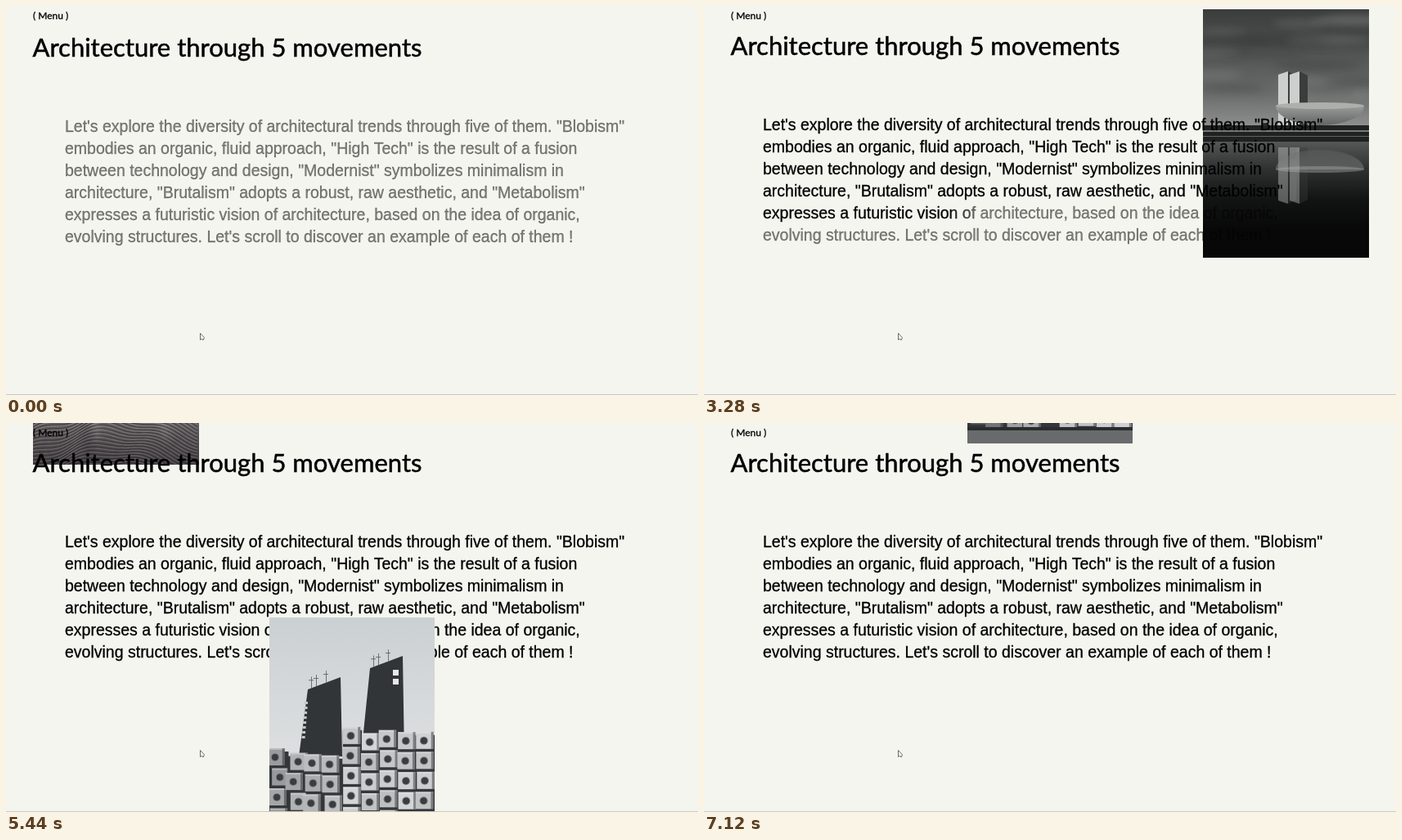
An HTML page with a canvas for the animation above (7200 ms loop, 846 px wide and 476 px high).

```html
<!DOCTYPE html>
<html lang="en">
<head>
<meta charset="utf-8">
<title>Architecture through 5 movements</title>
<style>
  html, body { margin: 0; width: 100%; height: 100%; overflow: hidden; background: #f5f5ef; }
  canvas { display: block; }
</style>
</head>
<body>
<canvas id="stage" width="846" height="476"></canvas>
<script>
const ctx = document.getElementById('stage').getContext('2d');
const LOOP = 7200, TICK = 80, TURN_GAP = 800, TURNS = 9;
const LAST_TURN = 0.68; // the page ends before the last wheel turn is used up
const BODY_FONT = '19.5px "Liberation Sans", Arial, sans-serif';
const TITLE_FONT = '31px Lato, sans-serif';
const MENU_FONT = '12px Lato, sans-serif';
const LINES = [
  'Let\'s explore the diversity of architectural trends through five of them. "Blobism"',
  'embodies an organic, fluid approach, "High Tech" is the result of a fusion',
  'between technology and design, "Modernist" symbolizes minimalism in',
  'architecture, "Brutalism" adopts a robust, raw aesthetic, and "Metabolism"',
  'expresses a futuristic vision of architecture, based on the idea of organic,',
  'evolving structures. Let\'s scroll to discover an example of each of them !'
];

const damped = x => 1 - (1 + x + x * x / 2) * Math.exp(-x);

function turnProgress(t, turn) {
  const length = turn < 5 ? 640 : 800;
  const rate = (turn < 5 ? 1.05 : 0.92) / TICK;
  const elapsed = Math.max(0, Math.min(t - turn * TURN_GAP, length));
  return damped(elapsed * rate) / damped(length * rate);
}

// Distance scrolled, in wheel turns.
function scrollAt(t) {
  let sum = 0;
  for (let turn = 0; turn < TURNS; turn++) {
    sum += turnProgress(t, turn) * (turn === TURNS - 1 ? LAST_TURN : 1);
  }
  return sum;
}

function seeded(seed) {
  return () => (seed = (seed * 16807) % 2147483647) / 2147483647;
}

function fade(g, from, to, ...colors) {
  const fill = g.createLinearGradient(0, from, 0, to);
  colors.forEach((color, i) => fill.addColorStop(i / (colors.length - 1), color));
  return fill;
}

function rect(g, x, y, w, h, fill) {
  g.fillStyle = fill;
  g.fillRect(x, y, w, h);
}

function poly(g, fill, ...points) {
  g.beginPath();
  points.forEach(([x, y]) => g.lineTo(x, y));
  g.closePath();
  g.fillStyle = fill;
  g.fill();
}

function oval(g, x, y, rx, ry, fill, end = Math.PI * 2) {
  g.beginPath();
  g.ellipse(x, y, rx, ry, 0, 0, end);
  g.fillStyle = fill;
  g.fill();
}

function picture(w, h, paint) {
  const c = document.createElement('canvas');
  c.width = w;
  c.height = h;
  paint(c.getContext('2d'), w, h);
  return c;
}

function twinTowersAndBowl(g) {
  for (const x of [92, 106]) {
    poly(g, '#cdcfce', [x, 80], [x + 12, 76], [x + 12, 145], [x, 145]);
    poly(g, '#3a3d3c', [x + 12, 76], [x + 22, 81], [x + 22, 145], [x + 12, 145]);
  }
  oval(g, 143, 118, 54, 24, fade(g, 116, 142, '#a0a2a0', '#626463'), Math.PI);
  oval(g, 143, 118, 54, 4, '#adafad');
}

const modernist = picture(203, 304, (g, w, h) => {
  const horizon = 157;
  const rnd = seeded(41);
  rect(g, 0, 0, w, horizon, fade(g, 0, horizon, '#3b3d3c', '#515352', '#6b6d6c', '#9a9b9a'));
  g.filter = 'blur(5px)';
  for (let i = 0; i < 22; i++) {
    const cloud = i % 2 ? 'rgba(150,152,150,0.22)' : 'rgba(40,42,41,0.22)';
    oval(g, rnd() * w, 12 + rnd() * 95, 25 + rnd() * 35, 3 + rnd() * 4, cloud);
  }
  g.filter = 'none';
  rect(g, 0, horizon, w, h, fade(g, horizon, 270, '#5b5d5d', '#303232', '#121313', '#080808'));
  twinTowersAndBowl(g);

  g.save();
  g.globalAlpha = 0.4;
  g.translate(0, horizon * 2);
  g.scale(1, -1);
  twinTowersAndBowl(g);
  g.restore();

  rect(g, 0, 142, w, 20, '#202121');
  rect(g, 0, 148, w, 2, '#777978');
  rect(g, 0, 155, w, 1, '#616362');
});

const organic = picture(203, 304, (g, w, h) => {
  const peak = 19, axis = 97;
  const rnd = seeded(12);
  const sky = g.createLinearGradient(0, 130, w, 40);
  sky.addColorStop(0, '#2f8dad');
  sky.addColorStop(1, '#57c6e5');
  rect(g, 0, 0, w, h, sky);

  // Both flanks widen as a power of the depth below the peak.
  const flank = y => 5.4 * (y - peak) ** 0.56 + 2 * Math.sin(y * 0.13);
  g.beginPath();
  for (let y = peak; y <= h; y += 3) g.lineTo(axis + flank(y), y);
  for (let y = h; y >= peak; y -= 3) g.lineTo(axis - flank(y), y);
  g.clip();
  rect(g, 0, 0, w, h, fade(g, peak, h, '#cfc6c4', '#bcb2b2', '#a39a9b', '#5a5658'));

  g.filter = 'blur(4px)';
  for (let i = 0; i < 26; i++) {
    const fold = i % 2 ? 'rgba(235,224,221,0.4)' : 'rgba(60,54,60,0.4)';
    oval(g, rnd() * w, 50 + rnd() * 230, 5 + rnd() * 9, 10 + rnd() * 22, fold);
  }
  g.filter = 'none';
  oval(g, 66, 98, 9, 26, '#294f62');
  oval(g, 166, 147, 7, 9, '#3d8aa5');

  // Undulating floor slabs drooping away from the axis
  g.lineWidth = 1.1;
  for (let y = -30; y < h; y += 4) {
    for (const [shift, color] of [[0, 'rgba(48,43,47,0.55)'], [1.6, 'rgba(237,226,224,0.45)']]) {
      g.beginPath();
      for (let x = 0; x <= w; x += 3) {
        const droop = Math.hypot(x - axis, 20) * 0.35;
        g.lineTo(x, y + shift + droop + 4 * Math.sin(x * 0.08 + y * 0.045));
      }
      g.strokeStyle = color;
      g.stroke();
    }
  }
  for (let y = 148; y < 174; y += 6) oval(g, axis, y, 3, 1.8, '#242326');
  rect(g, 0, 0, w, h, fade(g, 170, h, 'rgba(35,32,36,0)', 'rgba(35,32,36,0.5)'));
});

function slantedTower(g, x, top) {
  poly(g, '#323537', [x, top], [x + 40, top - 15], [x + 42, 170], [x - 11, 170]);
  for (const mast of [4, 10, 22]) {
    rect(g, x + mast, top - 14 - mast * 0.4, 0.8, 14, '#55595b');
    rect(g, x + mast - 3, top - 10 - mast * 0.4, 6, 0.8, '#55595b');
  }
}

function capsule(g, x, y, w, h, light) {
  rect(g, x, y, w, h, `rgb(${light},${light + 2},${light + 3})`);
  rect(g, x, y, w, 2, 'rgba(240,242,242,0.35)');
  rect(g, x + w - 3, y, 3, h, 'rgba(32,34,36,0.45)');
  oval(g, x + w * 0.45, y + h * 0.52, 5, 5, '#7c8082');
  oval(g, x + w * 0.45, y + h * 0.52, 4, 4, '#3a3d3f');
}

const capsules = picture(202, 376, (g, w, h) => {
  const columns = 9, pitch = w / columns, floorHeight = 24.5, ground = 356;
  const rnd = seeded(73);
  rect(g, 0, 0, w, h, fade(g, 0, 200, '#cbd0d3', '#e0e2e2'));
  slantedTower(g, 47, 88);
  slantedTower(g, 123, 62);
  for (let y = 103; y < 150; y += 6) rect(g, 43 - (y - 103) * 0.08, y, 4, 3, '#c5c8c8');
  for (const y of [64, 75]) rect(g, 151, y, 7, 7, '#e7e8e8');

  // Capsules protrude more on the left block; the right block is taller.
  for (let i = 0; i < columns; i++) {
    const leftBlock = i < 4;
    const top = (leftBlock ? 160 : 132) + rnd() * 10;
    rect(g, i * pitch, top + 4, pitch + 1, ground - top, '#34373a');
    for (let y = top; y < ground - 8; y += floorHeight) {
      const shade = leftBlock ? (4 - i) * (y > 245 ? 26 : 12) : 0;
      const light = Math.round(200 - shade + rnd() * 24 - 12);
      const jut = leftBlock ? rnd() * 8 - 4 : rnd() * 2 - 1;
      capsule(g, i * pitch + jut, y, pitch - 1, Math.min(21, ground - y), light);
    }
  }
  rect(g, 0, ground, w, 4, '#292c2e');
  rect(g, 0, ground + 4, w, 16, '#686a6c');
});

function text(string, x, y, weight) {
  ctx.lineWidth = weight;
  ctx.fillText(string, x, y);
  ctx.strokeText(string, x, y);
}

// Text turns from grey to black behind a front counted in letters.
function drawParagraph(front, dy) {
  const left = 72, soft = 5;
  ctx.font = BODY_FONT;
  let start = 0;
  LINES.forEach((line, row) => {
    const letter = ctx.measureText(line).width / line.length;
    const edge = left + (front - start) * letter;
    const ink = ctx.createLinearGradient(edge - soft * letter, 0, edge, 0);
    ink.addColorStop(0, '#000');
    ink.addColorStop(1, 'rgba(0,0,0,0.5)');
    ctx.fillStyle = ctx.strokeStyle = ink;
    text(line, left, 151.5 + row * 27 + dy, 0.3);
    start += line.length;
  });
}

function drawHeading(dy) {
  ctx.fillStyle = ctx.strokeStyle = '#000';
  ctx.font = MENU_FONT;
  text('( Menu )', 33, 16, 0.3);
  ctx.font = TITLE_FONT;
  text('Architecture through 5 movements', 32.5, 59.5 + dy, 0.5);
}

function drawPointer() {
  poly(ctx, '#fff', [237.5, 400.5], [237.5, 408.5], [239.5, 407], [241, 409], [242.5, 406]);
  ctx.strokeStyle = '#444';
  ctx.lineWidth = 0.8;
  ctx.stroke();
}

function draw(t) {
  const scroll = scrollAt(t);
  const dy = 2 * Math.max(0, 1 - scroll);
  rect(ctx, 0, 0, 846, 476, '#f5f5ef');
  ctx.drawImage(modernist, 610, Math.round(340 - 308 * (scroll - 3)));
  ctx.drawImage(organic, 33, Math.round(196 - 457 * (scroll - 6)));
  drawHeading(dy);
  drawParagraph(89 * scroll - 34, dy);
  ctx.drawImage(capsules, 322, Math.round(-116 - 347.5 * (scroll - 8)));
  rect(ctx, 0, 475, 846, 1, '#c9c9c5');
  drawPointer();
}

const origin = performance.now();
function frame() {
  const t = (performance.now() - origin) % LOOP;
  draw(Math.floor(t / TICK) * TICK);
  requestAnimationFrame(frame);
}
frame();
</script>
</body>
</html>
```
